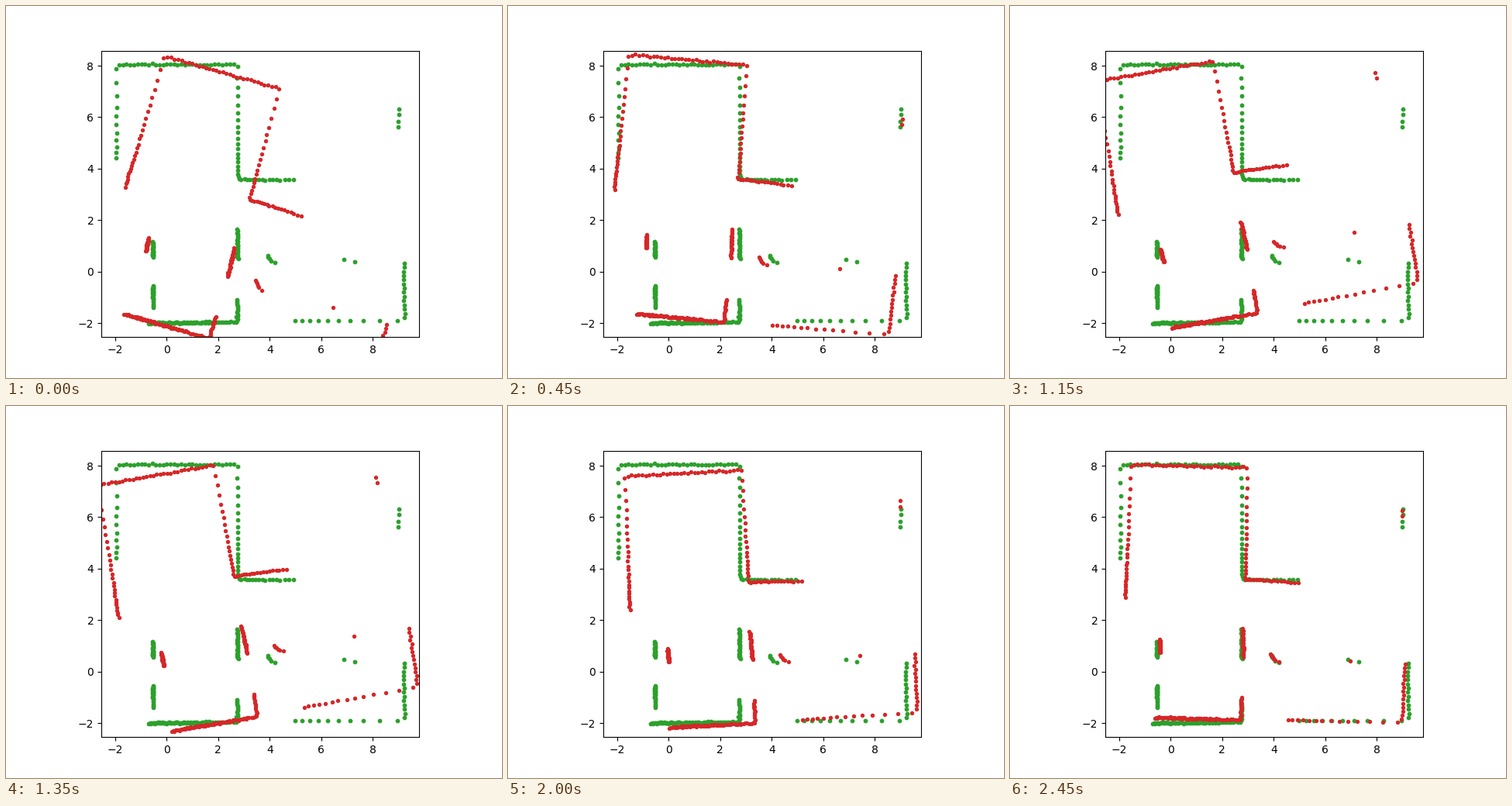
Animation, 640 px wide and 480 px high, one loop 2500 ms. Source, as a matplotlib script:

```python
import numpy as np
import matplotlib.pyplot as plt
from matplotlib.animation import FuncAnimation

FRAMES, INTERVAL = 50, 50
rng = np.random.default_rng(4)


def cross(a, b):
    return a[..., 0] * b[..., 1] - a[..., 1] * b[..., 0]


def sweep(sensor, phase, outlines, noise=0.03):
    """Range scan, one ray per degree, of outlines listed counter-clockwise."""
    hits = []
    for outline in outlines:
        corners = np.array(outline) - sensor
        bearings = np.degrees(np.arctan2(corners[:, 1], corners[:, 0])) - phase
        for i, wall in enumerate(np.diff(corners, axis=0)):
            rays = np.arange(np.ceil(bearings[i]), bearings[i + 1]) + phase
            rays = np.radians(rays)
            ray = np.column_stack([np.cos(rays), np.sin(rays)])
            reach = cross(corners[i], wall) / cross(ray, wall)
            reach += rng.uniform(-noise, noise, len(rays))
            hits.append(sensor + ray * reach[:, None])
    return np.vstack(hits)


def spline(x, y, start_slope, at):
    """Cubic spline with a given first slope and a natural end."""
    h = np.diff(x)
    d = np.diff(y, axis=0) / h[:, None]
    n = len(x)
    a, b = np.zeros((n, n)), np.zeros_like(y)
    a[0, 0], b[0] = 1, start_slope
    for i in range(1, n - 1):
        p, q = 1 / h[i - 1], 1 / h[i]
        a[i, i - 1:i + 2] = p, 2 * (p + q), q
        b[i] = 3 * (d[i - 1] * p + d[i] * q)
    a[-1, -2:], b[-1] = (1, 2), 3 * d[-1]
    m = np.linalg.solve(a, b)

    i = np.clip(np.searchsorted(x, at, side="right") - 1, 0, n - 2)
    w = h[i][:, None]
    t = (at - x[i])[:, None] / w
    return ((1 + 2 * t) * (1 - t) ** 2 * y[i] + t * (1 - t) ** 2 * w * m[i]
            + t * t * (3 - 2 * t) * y[i + 1] + t * t * (t - 1) * w * m[i + 1])


# Both scans see the same rooms from slightly different spots, in metres.
fixed = sweep(np.array([0, 0]), 0, [
    [(4.93, 3.57), (2.76, 3.57), (2.74, 8.05), (-1.96, 8.05), (-1.96, 4.38)],
    [(-0.73, -2.01), (2.73, -1.95), (2.75, -1.1)],
    [(4.9, -1.91), (9.22, -1.91), (9.22, 0.34)],
    [(2.83, 0.49), (2.74, 0.53), (2.74, 1.65)],
    [(4.2, 0.35), (4.0, 0.47), (3.9, 0.63)],
    [(7.34, 0.38), (6.84, 0.49)],
    [(8.98, 5.58), (9.03, 6.34)],
    [(-0.53, 1.145), (-0.54, 0.57)],
    [(-0.54, -0.57), (-0.53, -1.4)],
])
scan = sweep(np.array([0.44, 0.337]), 0.65, [
    [(4.97, 3.455), (2.895, 3.59), (2.97, 7.93), (-1.548, 8.06), (-1.77, 2.86)],
    [(-0.62, -1.78), (2.71, -1.877), (2.75, -0.99)],
    [(4.5, -1.877), (8.99, -1.967), (9.085, 0.29)],
    [(2.82, 0.56), (2.79, 1.68)],
    [(4.3, 0.35), (4.02, 0.47), (3.9, 0.69)],
    [(7.0, 0.36), (6.96, 0.42)],
    [(9.02, 6.03), (9.02, 6.3)],
    [(-0.434, 1.256), (-0.42, 0.744)],
])

# The moving scan swings past its place and settles: turn in degrees, shift.
PIVOT = np.array([4.96, 3.455])
KEYS = np.array([0, 9, 15, 23, 32, 40, 49], float)
POSES = np.array([
    (-14.2, 0.27, -1.3), (-3.6, -0.18, -0.12), (4.9, -0.48, 0.6),
    (11.5, -0.45, 0.69), (9.1, -0.03, 0.3), (4.6, 0.21, 0.06), (0, 0, 0),
])
poses = spline(KEYS, POSES, (0.6, -0.04, 0.066), np.arange(FRAMES))

fig, ax = plt.subplots(figsize=(6.4, 4.8), dpi=100)
ax.set_aspect("equal")
ax.set_xlim(3.631 - 6.175, 3.631 + 6.175)
ax.set_ylim(3.021 - 5.566, 3.021 + 5.566)
ax.set_xticks(range(-2, 9, 2))
ax.set_yticks(range(-2, 9, 2))

ax.plot(*fixed.T, ".", color="tab:green", markersize=6.3)
moving, = ax.plot([], [], ".", color="tab:red", markersize=5.7)


def update(frame):
    angle, *shift = poses[frame]
    c, s = np.cos(np.radians(angle)), np.sin(np.radians(angle))
    size = 1 + 0.0275 * (1 - frame / (FRAMES - 1)) ** 1.2
    turned = (scan - PIVOT) @ np.array([[c, s], [-s, c]])
    moving.set_data(*(PIVOT + shift + size * turned).T)
    return moving,


anim = FuncAnimation(fig, update, frames=FRAMES, interval=INTERVAL,
                     repeat=True, repeat_delay=0)
plt.show()
```
